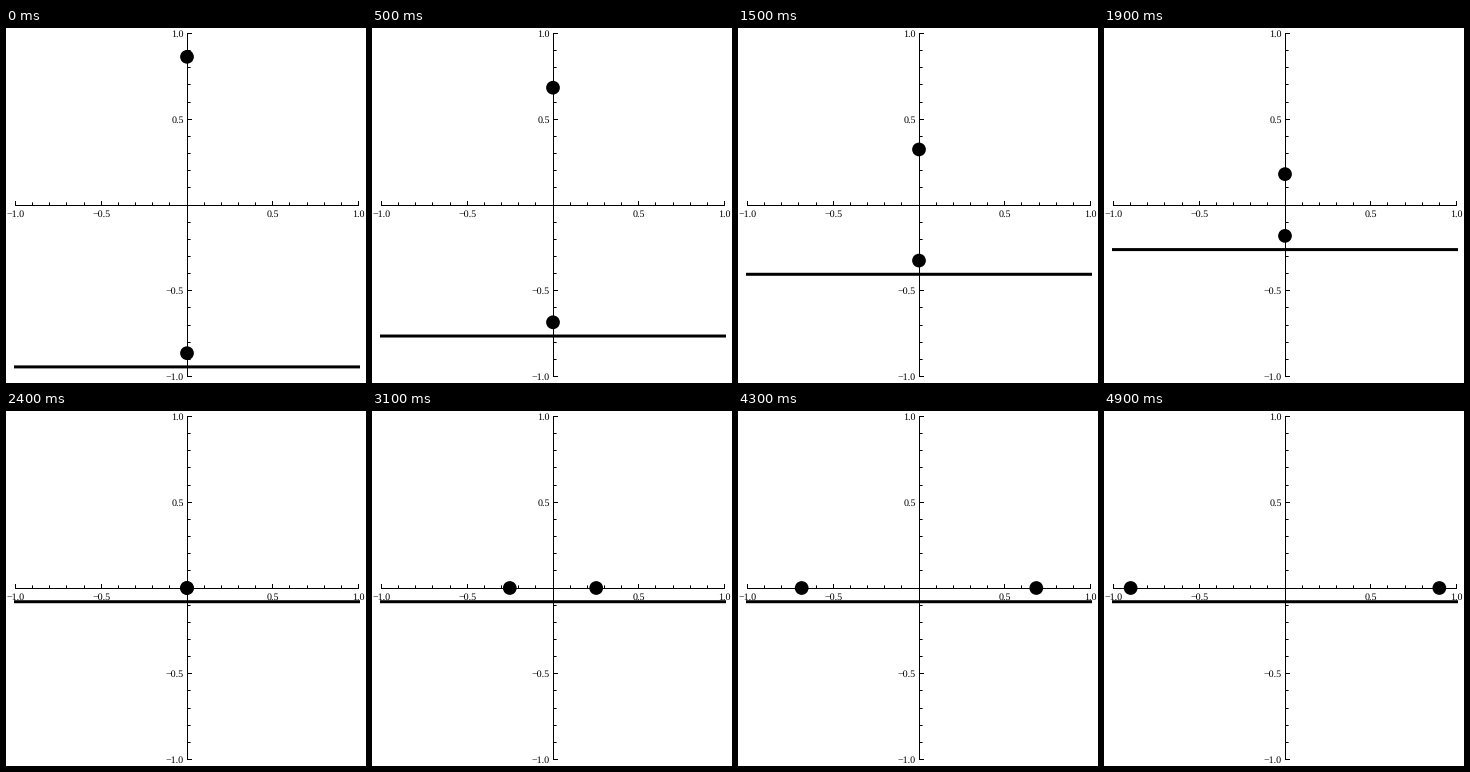
Write a matplotlib script that moves like this. It is 360 px wide and 355 px high and loops after 5 s.

```python
import math

import matplotlib.pyplot as plt
from matplotlib.animation import FuncAnimation
from matplotlib.patches import Circle

W, H, DPI = 360, 355, 100
PX = 72 / DPI                # one pixel in points
CX, CY, UNIT = 181, 177, 171.5
FRAMES, INTERVAL = 50, 100
STEP, MEETING = 0.036, 24    # units per frame, frame where the dots meet
GAP = 0.08                   # distance of the bar below the lower dot
RADIUS = 6.86

plt.rcParams["font.family"] = "Liberation Serif"
plt.rcParams["text.hinting"] = "none"

fig = plt.figure(figsize=(W / DPI, H / DPI), dpi=DPI, facecolor="white")
ax = fig.add_axes([0, 0, 1, 1])
ax.set_xlim(0, W)
ax.set_ylim(H, 0)
ax.axis("off")


def stroke(xs, ys, width=1, **kwargs):
    return ax.plot(xs, ys, color="black", lw=width * PX, snap=False,
                   solid_capstyle="butt", **kwargs)[0]


def pixel(value):
    return math.floor(value + 0.01) + 0.5


def label(x, y, value, align):
    text = f"{value:.1f}".replace("-", "\u2212")
    ax.text(x, y, text, fontsize=10 * PX, ha=align, va="baseline",
            color="black")


def draw_axes():
    stroke([CX - 172, CX + 172], [pixel(CY)] * 2)
    stroke([pixel(CX)] * 2, [CY - 172, CY + 172])
    for k in range(-10, 11):
        if k == 0:
            continue
        major = k % 5 == 0
        length = 4 if major else 2.6
        x, y = CX + k / 10 * UNIT, CY - k / 10 * UNIT
        stroke([pixel(x)] * 2, [CY, CY - length])
        stroke([CX + 1, CX + 1 + length], [pixel(y)] * 2)
        if major:
            label(x, 189, k / 10, "center")
            label(178, y + 3.5, k / 10, "right")


draw_axes()
bar = stroke([CX - 173, CX + 173], [CY, CY], width=3, zorder=4)
dots = [ax.add_patch(Circle((CX, CY), RADIUS, color="black", lw=0, zorder=5))
        for _ in range(2)]


def update(i):
    rise = STEP * max(MEETING - i, 0) * UNIT
    spread = STEP * max(i - MEETING, 0) * UNIT
    for dot, sign in zip(dots, (-1, 1)):
        dot.center = (CX + sign * spread, CY + sign * rise)
    y = CY + rise + GAP * UNIT
    bar.set_ydata([y, y])
    return [bar, *dots]


anim = FuncAnimation(fig, update, frames=FRAMES, interval=INTERVAL,
                     repeat=True, repeat_delay=0)
plt.show()
```
